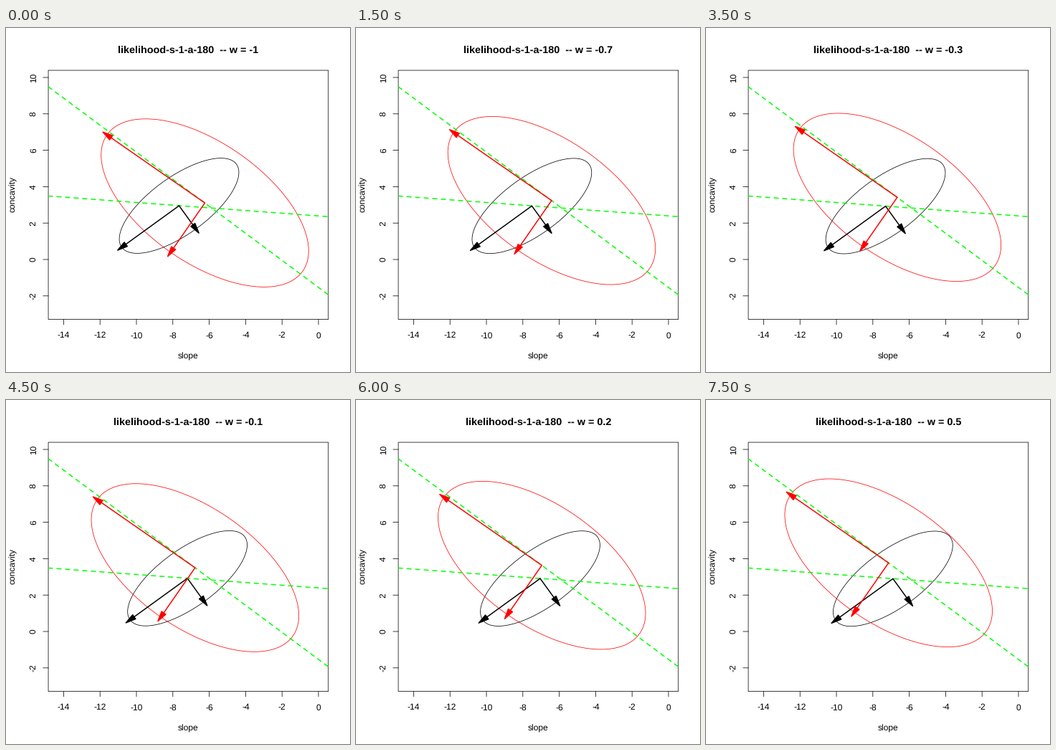
Animation of 480 by 480 pixels, one loop 8000 ms. Source, as a matplotlib script:

```python
import matplotlib.pyplot as plt
import numpy as np
from matplotlib.animation import FuncAnimation
from matplotlib.patches import Polygon, Rectangle
from matplotlib.transforms import Affine2D

SIZE = 480
DPI = 100
PX = 72 / DPI
UNIT = 25.4                     # pixels per data unit
X0, Y0 = 436, 323               # pixel position of the data origin
LEFT, TOP, RIGHT, BOTTOM = 59.04, 59.04, 449.76, 406.56
TICK = 7.2
FRAMES = 16
THIN, THICK = 0.75, 1.5
GREEN, RED, BLACK = "#00ff00", "#ff0000", "#000000"

plt.rcParams.update({
    "font.family": "Liberation Sans",
    "text.hinting": "none",
    "path.simplify": False,
    "path.snap": False,
})

fig = plt.figure(figsize=(SIZE / DPI, SIZE / DPI), dpi=DPI, facecolor="white")
ax = fig.add_axes([0, 0, 1, 1])
ax.set_xlim(0, SIZE)
ax.set_ylim(SIZE, 0)
ax.axis("off")


def line(xs, ys, color=BLACK, width=THIN, **kw):
    return ax.plot(xs, ys, color=color, lw=width * PX, **kw)[0]


def label(x, y, text, size=12, **kw):
    return ax.text(x, y, text, fontsize=size * PX, ha="center", va="baseline",
                   rotation_mode="anchor", **kw)


def draw_axes():
    frame = Rectangle((LEFT, TOP), RIGHT - LEFT, BOTTOM - TOP, fill=False,
                      ec=BLACK, lw=THIN * PX, joinstyle="round")
    ax.add_patch(frame)
    for v in range(-14, 1, 2):
        x = X0 + UNIT * v
        line([x, x], [BOTTOM, BOTTOM + TICK])
        label(x, 432.5, str(v))
    for v in range(-2, 11, 2):
        y = Y0 - UNIT * v
        line([LEFT, LEFT - TICK], [y, y])
        label(41.8, y, str(v), rotation=90)
    label(254.4, 461.3, "slope")
    label(13, 232.4, "concavity", rotation=90)
    return frame


def arrow_head(direction, end, length=14.1, half=3.55):
    """Triangle centred on the end of the shaft."""
    d = np.array(direction)
    side = half * np.array([-d[1], d[0]])
    tip, back = end + d * length / 2, end - d * length / 2
    return np.array([tip, back + side, back - side])


class Ellipse:
    """Outline with an arrow along each half axis; it slides along a line."""

    def __init__(self, color, start, step, a, b, axis, zorder):
        self.start, self.step = np.array(start), np.array(step)
        self.shift = Affine2D()
        tr = self.shift + ax.transData
        u = np.array([np.cos(axis), np.sin(axis)])
        v = np.array([u[1], -u[0]])

        t = np.linspace(0, 2 * np.pi, 361)[:, None]
        curve = a * np.cos(t) * u + b * np.sin(t) * v
        line(*curve.T, color, transform=tr, zorder=2)

        for d, r in ((u, a), (v, b)):
            end = r * d
            line([0, end[0]], [0, end[1]], color, THICK, transform=tr,
                 zorder=zorder, solid_capstyle="round")
            ax.add_patch(Polygon(arrow_head(d, end), fc=color, ec=color,
                                 lw=THICK * PX, joinstyle="round",
                                 transform=tr, zorder=zorder))

    def move(self, i):
        self.shift.clear().translate(*(self.start + i * self.step))


frame = draw_axes()
for y_left, y_right in ((82, 372.2), (234.4, 263.2)):
    guide = line([LEFT, RIGHT], [y_left, y_right], GREEN, THICK, zorder=3,
                 dashes=(4, 4), dash_capstyle="round")
    guide.set_clip_path(frame)

ellipses = [
    Ellipse(BLACK, (241.5, 248.0), (1.29, 0.09), 98.8, 40,
            np.radians(180 - 35.9), 4),
    Ellipse(RED, (277.5, 244.1), (-1.52, -1.12), 166.4, 83.8,
            np.radians(180 + 34.8), 5),
]
title = label(254.2, 34.8, "", 14.4, weight="bold")


def update(i):
    for e in ellipses:
        e.move(i)
    title.set_text(f"likelihood-s-1-a-180  -- w = {(i - 10) / 10:g}")
    return [title]


anim = FuncAnimation(fig, update, frames=FRAMES, interval=500, repeat=True,
                     repeat_delay=0, blit=False)
plt.show()
```
